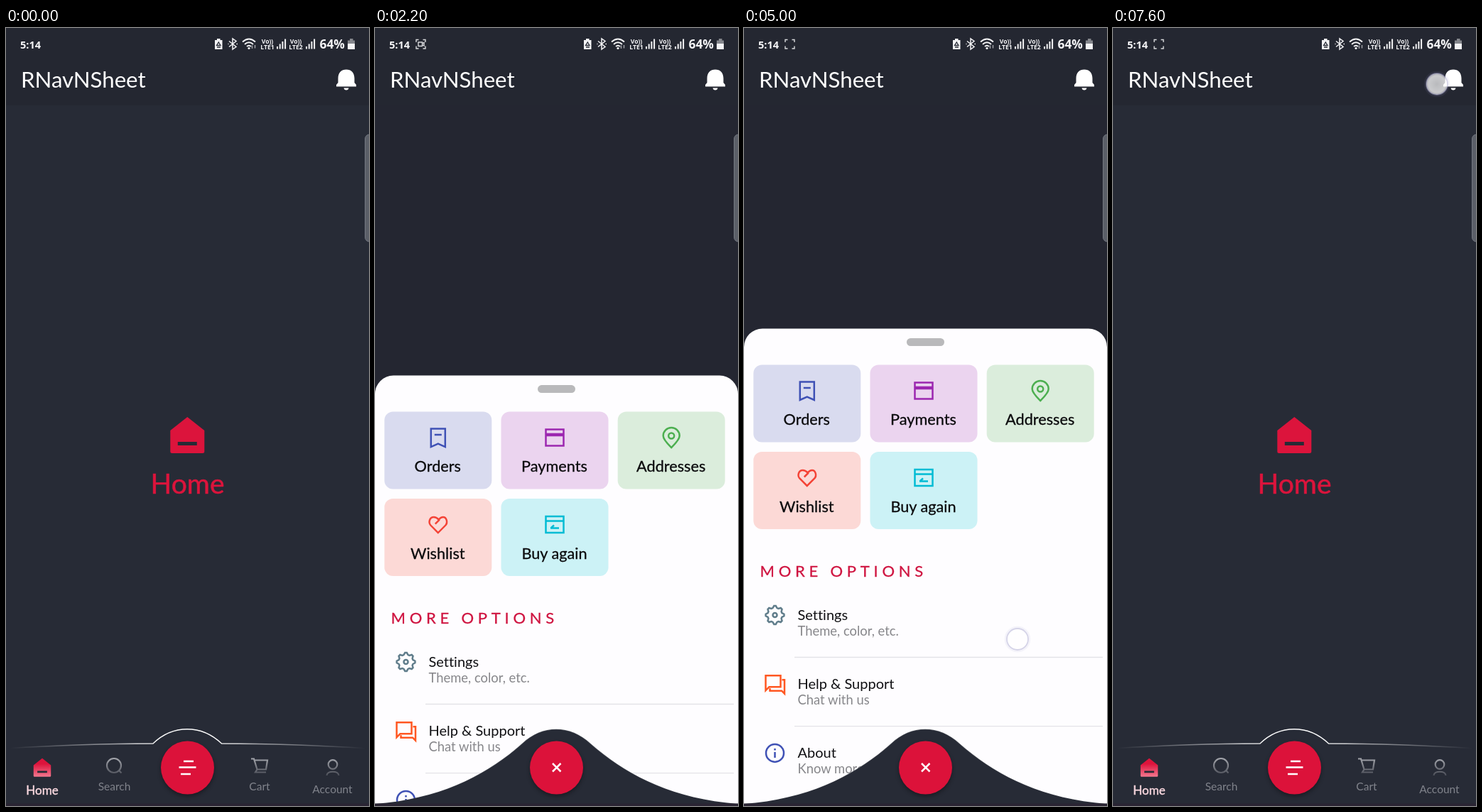
Recreate the animation shown at these times as an HTML page. Size 511 by 1096 pixels, loop 7.7 s.

```html
<!DOCTYPE html>
<html lang="en">
<head>
<meta charset="utf-8">
<title>RNavNSheet</title>
<style>
html, body { margin: 0; width: 100%; height: 100%; overflow: hidden; background: #272b36; }
svg { display: block; width: 100%; height: 100%; }
text { font-family: Lato, "Open Sans", sans-serif; font-variant-ligatures: none; }
.mid { text-anchor: middle; }
.line { fill: none; stroke: currentColor; stroke-width: 2.5; }
.status, .status text { font-family: "Noto Sans", "Open Sans", sans-serif; font-weight: 600; fill: #f4f4f6; }
.tiny { font-size: 8.6px; text-anchor: middle; }
.title { font-size: 31.2px; fill: #fff; }
.big { font-size: 39px; fill: #dc143c; stroke: #dc143c; stroke-width: .5; }
.nav { font-size: 15.5px; fill: #80838b; }
.on { font-size: 17px; fill: #fbd9e0; stroke: #fbd9e0; stroke-width: .4; }
.tile { font-size: 21.7px; fill: #0b0b0d; stroke: #0b0b0d; stroke-width: .3; }
.more { font-size: 22px; letter-spacing: 5.75px; fill: #cf1440; stroke: #cf1440; stroke-width: .3; }
.item { font-size: 20px; fill: #111114; }
.sub { font-size: 18.4px; fill: #87878b; }
</style>
</head>
<body>
<svg viewBox="0 0 511 1096" preserveAspectRatio="none">
  <defs>
    <linearGradient id="edge" gradientUnits="userSpaceOnUse" x1="0" y1="0" x2="511" y2="0">
      <stop offset=".01" stop-color="#fff" stop-opacity="0"/>
      <stop offset=".3" stop-color="#fff" stop-opacity=".55"/>
      <stop offset=".42" stop-color="#fff"/>
      <stop offset=".58" stop-color="#fff"/>
      <stop offset=".7" stop-color="#fff" stop-opacity=".55"/>
      <stop offset=".99" stop-color="#fff" stop-opacity="0"/>
    </linearGradient>
    <linearGradient id="red" x1="0" y1="0" x2="0" y2="1">
      <stop offset=".3" stop-color="#dc143c"/>
      <stop offset="1" stop-color="#f3788f"/>
    </linearGradient>
    <linearGradient id="grey" gradientUnits="userSpaceOnUse" x1="0" y1="1028" x2="0" y2="1055">
      <stop offset="0" stop-color="#a6a8ae"/>
      <stop offset="1" stop-color="#454852"/>
    </linearGradient>
    <radialGradient id="dot">
      <stop offset="0" stop-color="#fff" stop-opacity=".68"/>
      <stop offset=".8" stop-color="#fff" stop-opacity=".76"/>
      <stop offset="1" stop-color="#fff" stop-opacity=".6"/>
    </radialGradient>
    <filter id="soft" x="-30%" y="-30%" width="160%" height="160%"><feGaussianBlur stdDeviation="3"/></filter>
    <path id="house" fill-rule="evenodd" d="M0-26 24-7V22.5Q24 25 21.5 25H-21.5Q-24 25-24 22.5V-7ZM-13.5 9V14H13.5V9Z"/>
  </defs>

  <rect width="511" height="1096" fill="#272b36"/>
  <rect width="511" height="109" fill="#242731"/>
  <use href="#house" x="255.3" y="574" fill="#dc143c"/>
  <text class="big mid" x="255.5" y="656">Home</text>
  <rect id="dim" y="109" width="511" height="987" fill="#242631"/>

  <text class="title" x="21" y="83.5">RNavNSheet</text>
  <path fill="#fff" d="M465 82.5V80l2.5-3V71C467.5 63 472 58.5 479 58.5S490.5 63 490.5 71V77l2.5 3V82.5ZM475.5 84.500H482.5Q482 87.5 479 87.5T475.5 84.500Z"/>

  <g id="sheet">
    <path fill="#fefdff" d="M0 25.5A26 26 0 0 1 26-.5H485A26 26 0 0 1 511 25.5V1100H0Z"/>
    <rect x="229" y="13" width="53" height="11" rx="5.5" fill="#b9b9bb"/>
    <g id="tiles"></g>
    <text class="more" x="22.5" y="348.5">MORE OPTIONS</text>
    <g id="list"></g>
  </g>

  <path id="bar" fill="#272b36"/>
  <path id="rim" fill="none" stroke="url(#edge)" stroke-width="1.4"/>
  <rect y="1092.5" width="511" height="3.5" fill="#2a2433"/>

  <g id="tabs">
    <use href="#house" transform="translate(51 1042) scale(.51)" fill="url(#red)"/>
    <text class="on mid" x="51" y="1080">Home</text>
    <g fill="none" stroke="url(#grey)" stroke-width="2.2">
      <circle cx="152" cy="1039" r="10"/>
      <path d="M159 1046 162.5 1049.5"/>
      <path d="M345 1029.5H349L353.5 1044.5H366L368 1031.5H350M353.5 1044.5 351 1048.5H366"/>
      <circle cx="460" cy="1037.5" r="6.3"/>
      <path d="M451.5 1053C452 1046 468 1046 468.5 1053"/>
    </g>
    <text class="nav mid" x="152.5" y="1074">Search</text>
    <text class="nav mid" x="357" y="1074">Cart</text>
    <text class="nav mid" x="459.5" y="1077.5">Account</text>
  </g>

  <circle cx="255.5" cy="1045" r="37" fill="#000" opacity=".4" filter="url(#soft)"/>
  <circle cx="255.5" cy="1042" r="37.5" fill="#dc123a"/>
  <path id="glyph" fill="none" stroke="#fff" stroke-width="2.5"/>
  <path id="middle" fill="none" stroke="#fff" stroke-width="2.5" d="M243.5 1041.5H267.5"/>

  <rect x="505.5" y="150" width="14" height="151" rx="6" fill="#5b5f68" stroke="#737780"/>

  <g class="status">
    <text x="20" y="28.5" font-size="14.6">5:14</text>
    <g id="rec" fill="none" stroke="#d8d9dc" stroke-width="1.4">
      <path d="M58 20V16.5H61.5M67.5 16.5H71V20M71 25.5V29H67.5M61.5 29H58V25.5"/>
      <path id="cam" d="M61 20H66.5V25.5H61ZM66.5 22 69 20.5V25L66.5 23.5"/>
    </g>
    <path d="M294 17H297V15H301.5V17H304.5V30H294Z"/>
    <path d="M296.5 24.5 299.3 20 302 24.5ZM297 27H302" fill="none" stroke="#272b36" stroke-width="1.3"/>
    <path d="M314 18.5 324 26.5 319 30V15L324 18.5 314 26.5M312.5 22.5H313.5M324.5 22.5H326" fill="none" stroke="#f4f4f6" stroke-width="1.5"/>
    <g fill="none" stroke="#f4f4f6" stroke-width="1.9">
      <path d="M333 19.5Q342 11.5 351 19.5M336 23Q342 17.5 348 23M339 26Q342 23.5 345 26"/>
      <path d="M346.5 29V24.5M350.5 24V28.5" stroke-width="1.5" opacity=".6"/>
    </g>
    <circle cx="342" cy="28.5" r="1.6"/>
    <text class="tiny" x="368" y="21.5">Vo))</text>
    <text class="tiny" x="368" y="30">LTE1</text>
    <text class="tiny" x="408" y="21.5">Vo))</text>
    <text class="tiny" x="408" y="30">LTE2</text>
    <path id="bars" fill="none" stroke="#f4f4f6" stroke-width="2"/>
    <text x="441.5" y="28.5" font-size="17.3">64%</text>
    <path d="M481 17.5H484V15H488.5V17.5H491V30H481Z" fill="#84868c"/>
    <path d="M481 22H491V30H481Z"/>
  </g>

  <g id="touch">
    <circle r="17" fill="none" stroke="#8d8dc4" stroke-opacity=".09" stroke-width="2.5"/>
    <circle r="15" fill="url(#dot)" stroke="#a9a8cf" stroke-opacity=".48" stroke-width="1.8"/>
  </g>
</svg>

<script>
const $ = id => document.getElementById(id);
const LOOP = 7700, STEP = 100, SHUT = 1096, OPEN = 398;
const clamp = v => Math.max(0, Math.min(1, v));
const mix = (a, b, u) => a + (b - a) * u;
const smooth = u => u * u * (3 - 2 * u);
const out = u => 1 - (1 - u) ** 3;

// Sheet contents
const card = 'M-12.5-11.5H12.5V11.5H-12.5Z';
const tiles = [
  ['Orders', '#3f51b5', '#d9dbef', 'M-10-12.5H10V13L0 8.5-10 13ZM-5-4H5'],
  ['Payments', '#9c27b0', '#ebd4ef', card + 'M-12-5H12M-12-3H12'],
  ['Addresses', '#4caf50', '#dbeddc', 'M0 14C-3 11-11.5 3-11.5-2.5A11.5 11.5 0 0 1 11.5-2.5C11.5 3 3 11 0 14ZM-4-2.5A4 4 0 0 0 4-2.5 4 4 0 0 0-4-2.5'],
  ['Wishlist', '#f44336', '#fcd9d6', 'M0 11.5-10.5 1C-14-3-12-10.5-6-10.5-3-10.5-1-9 1-7 3-9.5 5-10.5 7-10.5 12-10.5 14-3 10.5 1ZM2-7-4-1'],
  ['Buy again', '#00bcd4', '#ccf2f6', card + 'M-12-5H12M-6 5H6M-5.5 5-1 1']
];
$('tiles').innerHTML = tiles.map(([name, ink, fill, d], i) => {
  const x = 13.3 + (i % 3) * 164.2, y = 50.5 + (i > 2 ? 122.5 : 0);
  return `<g transform="translate(${x} ${y})" color="${ink}">
    <rect width="151" height="109" rx="12" fill="${fill}"/>
    <path class="line" transform="translate(75.5 36.5)" d="${d}"/>
    <text class="tile mid" x="75" y="84.5">${name}</text></g>`;
}).join('');

const gear = Array.from({ length: 32 }, (_, i) => {
  const a = (i - .5) / 32 * Math.PI * 2, r = i % 4 < 2 ? 13 : 10.3;
  return (r * Math.sin(a)).toFixed(1) + ' ' + (-r * Math.cos(a)).toFixed(1);
}).join('L');
const items = [
  ['Settings', 'Theme, color, etc.', '#607d8b', `M${gear}ZM-3 0A3 3 0 0 0 3 0 3 3 0 0 0-3 0`],
  ['Help &amp; Support', 'Chat with us', '#ff5722', 'M-13 9V-12H8V4H-8ZM10-6H13.5V13.5L9.5 9.5H-7V6'],
  ['About', 'Know more about us', '#3f51b5', 'M-12.5 0A12.5 12.5 0 0 0 12.5 0 12.5 12.5 0 0 0-12.5 0M0-1.5V6.5M0-6.5V-4']
];
$('list').innerHTML = items.map(([name, sub, ink, d], i) =>
  `<g transform="translate(0 ${403 + i * 97.2})" color="${ink}">
    <path class="line" transform="translate(43.5 0)" d="${d}"/>
    <text class="item" x="75.5" y="7">${name}</text>
    <text class="sub" x="75.5" y="28.5">${sub}</text>
    ${i < 2 ? '<path d="M71 59.5H505" stroke="#e3e3e8" stroke-width="1.3"/>' : ''}</g>`).join('');

$('bars').setAttribute('d', [382, 423].map(x =>
  [0, 1, 2, 3].map(i => `M${x + i * 3.7} 29.5V${26 - i * 3.5}`).join('')).join(''));

// Sheet top edge: time, y, easing into that key
const keys = [
  [0, SHUT], [640, SHUT], [1200, OPEN, out],
  [1480, OPEN], [1700, 411], [1900, 520], [2050, 560], [2380, OPEN],
  [2500, OPEN], [2700, 437], [2820, 570], [3050, SHUT, out],
  [3850, SHUT], [4300, OPEN, out],
  [4850, OPEN], [5000, 424], [5200, 530], [5350, 570], [5750, OPEN],
  [6020, OPEN], [6100, 405], [6250, 530], [6480, SHUT, out], [LOOP, SHUT]
];
function sheetAt(t) {
  const i = keys.findIndex(k => k[0] > t), [t0, y0] = keys[i - 1], [t1, y1, ease = smooth] = keys[i];
  return mix(y0, y1, ease((t - t0) / (t1 - t0)));
}

// Touches: from, to, x, y; a drag keeps y relative to the sheet
const touches = [
  [600, 700, 255, 1042], [3900, 4000, 255, 1042], [7600, 7700, 456, 79],
  [1500, 2000, 391, 412, true], [2500, 2800, 459, 526, true],
  [4900, 5300, 385, 437, true], [6000, 6200, 407, 515, true]
];

const rimLow = [1015, 1009, 1008], rimHigh = [1093, 1086, 1050];
function rimPath(q) {
  const [a, b, c] = rimLow.map((y, i) => mix(y, rimHigh[i], q));
  return `M0 ${a}C95 ${b} 160 ${c} 207 1008C235 981 275 981 303.5 1008C351 ${c} 416 ${b} 511 ${a}`;
}

const menu = [250, 1033, 264, 1033, 246, 1051, 260, 1051];
const cross = [250, 1036, 261.5, 1047.5, 250, 1047.5, 261.5, 1036];

function draw(t) {
  const y = sheetAt(t), p = clamp((SHUT - y) / (SHUT - OPEN)), q = clamp(p * 1.3);
  $('sheet').setAttribute('transform', `translate(0 ${y})`);
  $('dim').setAttribute('opacity', q);
  const rim = rimPath(q);
  $('rim').setAttribute('d', rim);
  $('rim').setAttribute('opacity', 1 - .8 * q);
  $('bar').setAttribute('d', rim + 'V1096H0Z');
  $('tabs').setAttribute('opacity', clamp(1 - q * 1.7));
  $('tabs').setAttribute('transform', `translate(0 ${q * 30})`);
  const g = menu.map((v, i) => mix(v, cross[i], q));
  $('glyph').setAttribute('d', `M${g.slice(0, 4).join(' ')}M${g.slice(4).join(' ')}`);
  $('middle').setAttribute('opacity', 1 - q);

  $('rec').setAttribute('opacity', clamp(t / 300));
  $('cam').setAttribute('opacity', (t + 900) % 1000 < 500 ? 1 : 0);

  const hit = touches.find(([from, to]) => t >= from && t < to + 100);
  $('touch').setAttribute('opacity', hit ? (t < hit[1] ? 1 : .4) : 0);
  if (hit) {
    const [, , x, dy, drag] = hit;
    $('touch').setAttribute('transform', `translate(${x} ${drag ? Math.min(y + dy, 1080) : dy})`);
  }
}

const start = performance.now();
function tick() {
  const t = (performance.now() - start) % LOOP;
  draw(Math.floor(t / STEP) * STEP);
  requestAnimationFrame(tick);
}
tick();
</script>
</body>
</html>
```
